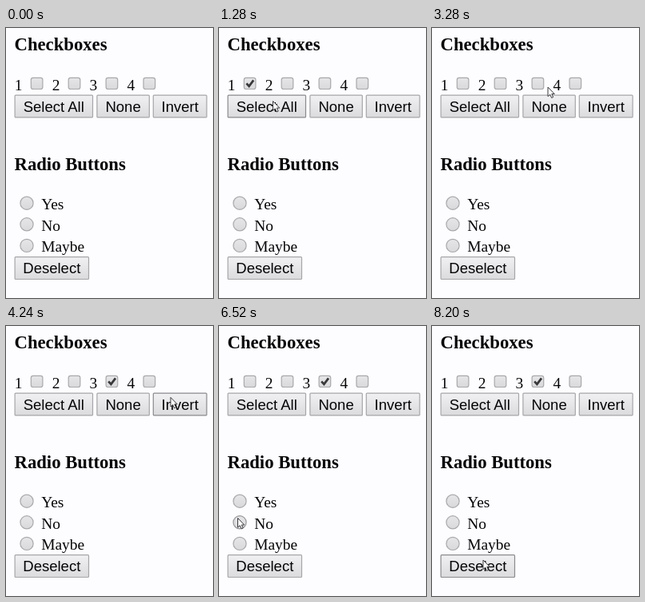
Recreate the animation shown at these times as an HTML page. Size 259 by 338 pixels, loop 8520 ms.

```html
<!DOCTYPE html>
<html lang="en">
<head>
<meta charset="utf-8">
<title>Checkboxes and radio buttons</title>
<style>
  html, body { margin: 0; width: 100%; height: 100%; overflow: hidden; background: #fdfcff; }
  svg { display: block; width: 259px; height: 338px; }
  text { font: 19.4px "Liberation Serif", serif; fill: #050506; }
  .title { font-size: 22.7px; font-weight: bold; }
  .button text { font: 18.5px "Liberation Sans", sans-serif; }
  .button rect { fill: url(#face); stroke: #a6a6a8; stroke-width: 1.2; }
  .box, .radio circle { fill: url(#dim); stroke: #a9a9ab; stroke-width: 1.2; }
  .hover rect { stroke: #8a8a8d; }
  .hover .box, .hover circle { stroke: #969698; }
  .press rect, .press .box, .press circle:first-child { fill: #d2d2d4; }
  .tick { fill: none; stroke: #38383b; stroke-width: 2.7; }
  .radio .dot { fill: #55555a; stroke: none; }
  .mark { visibility: hidden; }
  .on .mark { visibility: visible; }
  #cursor { fill: #fff; stroke: #38383c; stroke-width: 1; stroke-linejoin: round; }
</style>
</head>
<body>
<svg viewBox="0 0 259 338">
  <defs>
    <linearGradient id="face" x2="0" y2="1">
      <stop stop-color="#f1f0f3"/>
      <stop offset="1" stop-color="#dbdadd"/>
    </linearGradient>
    <linearGradient id="dim" x2="0" y2="1">
      <stop stop-color="#e6e5e8"/>
      <stop offset="1" stop-color="#d9d8db"/>
    </linearGradient>
  </defs>
  <text class="title" x="10.5" y="28.4">Checkboxes</text>
  <text class="title" x="10.5" y="178.4">Radio Buttons</text>
  <g id="controls"></g>
  <path id="cursor" d="M0 0V11.6L2.7 9.2L4.6 13.4L6.6 12.5L4.8 8.5H8.2Z"/>
</svg>
<script>
const LOOP = 8520;
const root = document.getElementById('controls');
const cursor = document.getElementById('cursor');
const controls = [];

function addControl(type, markup, x, y, w, h) {
  const node = document.createElementNS('http://www.w3.org/2000/svg', 'g');
  node.innerHTML = markup;
  root.append(node);
  controls.push({ node, type, x, y, w, h });
}

function addButton(label, x, y, w) {
  const h = 28.8;
  addControl('button',
    `<rect x="${x + .5}" y="${y + .5}" width="${w - 1}" height="${h - 1}" rx="1"/>
     <text x="${x + w / 2}" y="${y + 21}" text-anchor="middle">${label}</text>`, x, y, w, h);
}

for (let i = 0; i < 4; i++) {
  const x = 30.8 + i * 46.9;
  addControl('check',
    `<text x="${x - 20}" y="78.4">${i + 1}</text>
     <rect class="box" x="${x + .5}" y="62.3" width="14.6" height="14.2" rx="2.5"/>
     <path class="tick mark" d="M${x + 3.6} 69.3l3.2 3.5l5.6-7.4"/>`, x, 62, 15.6, 15);
}
['Yes', 'No', 'Maybe'].forEach((label, i) => {
  const y = 219.2 + i * 26.6;
  addControl('radio',
    `<circle cx="26" cy="${y}" r="8.1"/>
     <circle class="dot mark" cx="26" cy="${y}" r="4"/>
     <text x="44.2" y="${y + 8}">${label}</text>`, 18, y - 8, 16, 16);
});
addButton('Select All', 10.6, 83.6, 98.4);
addButton('None', 113.4, 83.6, 66.4);
addButton('Invert', 183.8, 83.6, 67.8);
addButton('Deselect', 10.6, 286.2, 93.4);

// Each move: start, end, destination. The first one begins at ENTRY.
const ENTRY = [150, 190];
const moves = [
  [360, 800, 37, 67],
  [1040, 1300, 68, 92],
  [2000, 2420, 166, 102],
  [2920, 3440, 139, 66],
  [3840, 4360, 216.3, 93],
  [5760, 6360, 23.5, 240.5],
  [7280, 7680, 64, 293]
];

// Each click: time, then the new on/off state of each checkbox and radio.
const clicks = [
  [960, '1000 000'],
  [1760, '1111 000'],
  [2720, '0000 000'],
  [3640, '0010 000'],
  [4600, '1101 000'],
  [5560, '0010 000'],
  [6680, '0010 010'],
  [7880, '0010 000']
];

const ease = p => p * p * (3 - 2 * p);

function cursorAt(t) {
  let [x, y] = ENTRY;
  for (const [start, end, toX, toY] of moves) {
    if (t < start) break;
    const p = ease(Math.min(1, (t - start) / (end - start)));
    x += (toX - x) * p;
    y += (toY - y) * p;
  }
  return [x, y];
}

function draw(now) {
  const t = now % LOOP;
  const [x, y] = cursorAt(t);
  const visible = t >= moves[0][0];
  const pressed = clicks.some(([at]) => t >= at - 100 && t < at);
  const last = clicks.filter(([at]) => t >= at).pop();
  const state = (last ? last[1] : '').replace(' ', '');

  cursor.style.visibility = visible ? 'visible' : 'hidden';
  cursor.setAttribute('transform', `translate(${x} ${y})`);
  controls.forEach((c, i) => {
    const over = visible && x >= c.x && x < c.x + c.w && y >= c.y && y < c.y + c.h;
    c.node.setAttribute('class', [
      c.type, over && 'hover', over && pressed && 'press', state[i] === '1' && 'on'
    ].filter(Boolean).join(' '));
  });
}

const began = performance.now();
function tick() {
  draw(performance.now() - began);
  requestAnimationFrame(tick);
}
tick();
</script>
</body>
</html>
```
